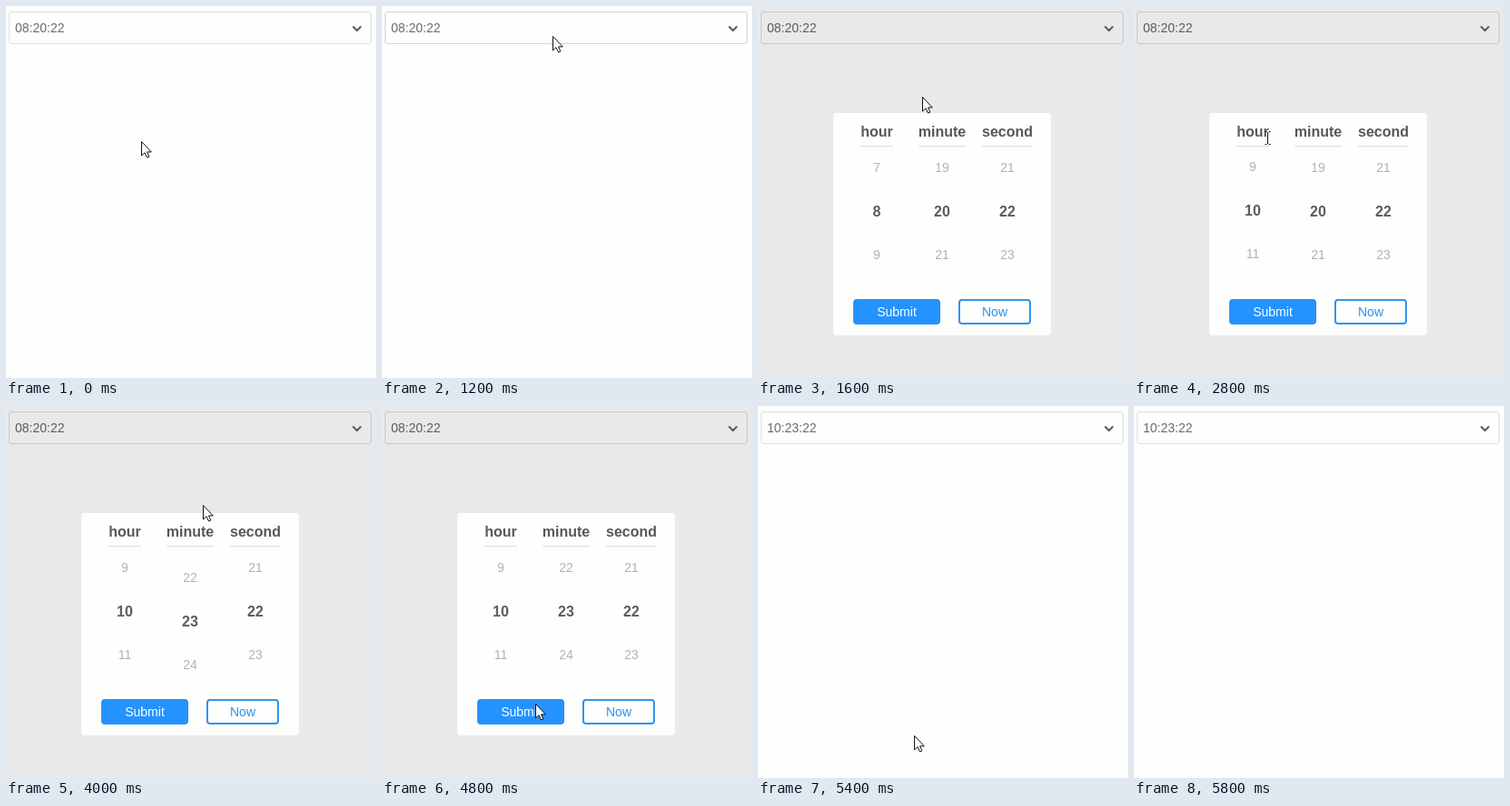
Write an HTML page that moves like this. It is 408x410 px and loops after 6000 ms.

```html
<!DOCTYPE html>
<html lang="en">
<head>
<meta charset="utf-8">
<title>Time picker</title>
<style>
  html, body { margin: 0; width: 100%; height: 100%; overflow: hidden; background: #fefefd; }
  svg { display: block; font: 14px "Liberation Sans", Arial, sans-serif; }
  .page { fill: #fefefd; }
  .field { fill: none; stroke: #dedede; }
  .hover .field { stroke: #d2d2d2; }
  .value { fill: #6a6a6a; }
  .chevron { fill: none; stroke: #5c5c5c; stroke-width: 2; }
  .open .page { fill: #e9e9eb; }
  .open .field { stroke: #c8c8ca; }
  .open .value { fill: #5a5a5a; }
  .panel, .overlay { visibility: hidden; }
  .open .panel { visibility: visible; }
  .panel text { text-anchor: middle; }
  .head { font-size: 16px; font-weight: bold; fill: #58585a; }
  .rule { stroke: #dcdcdc; }
  .num { fill: #b2b2b2; }
  .num.on { font-size: 16px; font-weight: bold; fill: #5c5c5c; }
  .arrow { fill: #fff; stroke: #111; stroke-linejoin: miter; }
  .beam { fill: none; stroke: #111; }
</style>
</head>
<body>
<svg id="stage" width="408" height="410">
  <defs>
    <clipPath id="window"><rect x="83" y="155" width="240" height="144"/></clipPath>
  </defs>
  <rect class="page" width="408" height="410"/>
  <rect class="field" x="3.5" y="6.5" width="399" height="35" rx="2.5"/>
  <text class="value" id="value" x="10" y="29"></text>
  <path class="chevron" d="M382.5 22.5 L387 27 L391.5 22.5"/>
  <g class="panel" id="panel">
    <rect x="83" y="118" width="240" height="245" rx="4" fill="#fefefd"/>
    <g id="content">
      <g id="heads"></g>
      <g id="wheels" clip-path="url(#window)"></g>
      <rect x="105" y="323" width="96" height="28" rx="4" fill="#2492ff"/>
      <text x="153" y="342" fill="#fff">Submit</text>
      <rect x="222" y="324" width="78" height="26" rx="3" fill="#fefefd" stroke="#2f93f0" stroke-width="2"/>
      <text x="261" y="342" fill="#2f93f0">Now</text>
    </g>
  </g>
  <g id="cursor">
    <path class="arrow" id="arrow" d="M.5 .5 V16 L4 12.7 L6.6 18 L8.9 17 L6.5 11.9 H11.3 Z"/>
    <path class="beam" id="beam" d="M-2.5 -6.5 H-.5 M1.5 -6.5 H3.5 M.5 -6 V7 M-2.5 7.5 H-.5 M1.5 7.5 H3.5"/>
  </g>
</svg>
<script>
const LOOP = 6000, STEP = 200, ROW = 48;
const $ = id => document.getElementById(id);

// [step, x, y]
const path = [
  [0, 150, 150], [3, 178, 86], [5, 192, 36], [6, 189, 34], [7, 189, 36], [8, 182, 101],
  [10, 151, 226], [11, 147, 242], [12, 147, 212], [13, 147, 166], [14, 147, 145],
  [15, 165, 185], [16, 195, 236], [17, 210, 243], [18, 213, 212], [19, 216, 152],
  [20, 218, 110], [21, 218, 101], [22, 206, 172], [23, 182, 282], [24, 170, 329],
  [25, 169, 336], [26, 169, 336], [28, 176, 392]
];

const wheels = [
  { name: "hour", x: 131, half: 18, start: 8, press: 11, release: 15, from: 242, turns: 2 },
  { name: "minute", x: 203, half: 26, start: 20, press: 17, release: 22, from: 243, turns: 3 },
  { name: "second", x: 275, half: 28, start: 22, press: 99, release: 99, from: 0, turns: 0 }
];

function add(parent, tag, attrs, text = "") {
  const el = document.createElementNS("http://www.w3.org/2000/svg", tag);
  for (const key in attrs) el.setAttribute(key, attrs[key]);
  el.textContent = text;
  return parent.appendChild(el);
}

for (const w of wheels) {
  add($("heads"), "text", { class: "head", x: w.x, y: 144 }, w.name);
  add($("heads"), "path", { class: "rule", d: `M${w.x - w.half} 154.5 H${w.x + w.half}` });
  w.rows = [];
  for (let i = -1; i <= w.turns + 1; i++)
    w.rows.push({ i, el: add($("wheels"), "text", { x: w.x }, w.start + i) });
}

function cursorAt(k) {
  let n = 1;
  while (n < path.length - 1 && path[n][0] < k) n++;
  const [k0, x0, y0] = path[n - 1], [k1, x1, y1] = path[n];
  const p = Math.min(1, (k - k0) / (k1 - k0));
  return [Math.round(x0 + (x1 - x0) * p), Math.round(y0 + (y1 - y0) * p)];
}

function turnWheel(w, k, y) {
  const scroll = k < w.press ? 0 : k >= w.release ? w.turns * ROW : w.from - y;
  const current = Math.round(scroll / ROW);
  for (const { i, el } of w.rows) {
    const on = i === current;
    el.setAttribute("class", on ? "num on" : "num");
    el.setAttribute("y", (on ? 232 : 231) + i * ROW - scroll);
  }
}

function draw(now) {
  const k = Math.floor((now % LOOP) / STEP);
  const [x, y] = cursorAt(k);
  const open = k >= 7 && k <= 26;
  const sliding = k === 7 || k === 26;
  $("stage").classList.toggle("open", open);
  $("stage").classList.toggle("hover", y < 42);
  $("value").textContent = k >= 26 ? "10:23:22" : "08:20:22";
  $("panel").setAttribute("transform", `translate(0 ${sliding ? 110 : 0})`);
  $("content").setAttribute("opacity", sliding ? 0.78 : 1);
  for (const w of wheels) turnWheel(w, k, y);

  const overHead = open && !sliding && y > 128 && y < 152 &&
    wheels.some(w => Math.abs(x - w.x) <= w.half);
  $("arrow").style.display = overHead ? "none" : "";
  $("beam").style.display = overHead ? "" : "none";
  $("cursor").style.display = k === 29 ? "none" : "";
  $("cursor").setAttribute("transform", `translate(${x - (overHead ? 0 : 1)} ${y - (overHead ? 0 : 1)})`);
  requestAnimationFrame(loop);
}

const begin = performance.now();
function loop() { draw(performance.now() - begin); }
loop();
</script>
</body>
</html>
```
